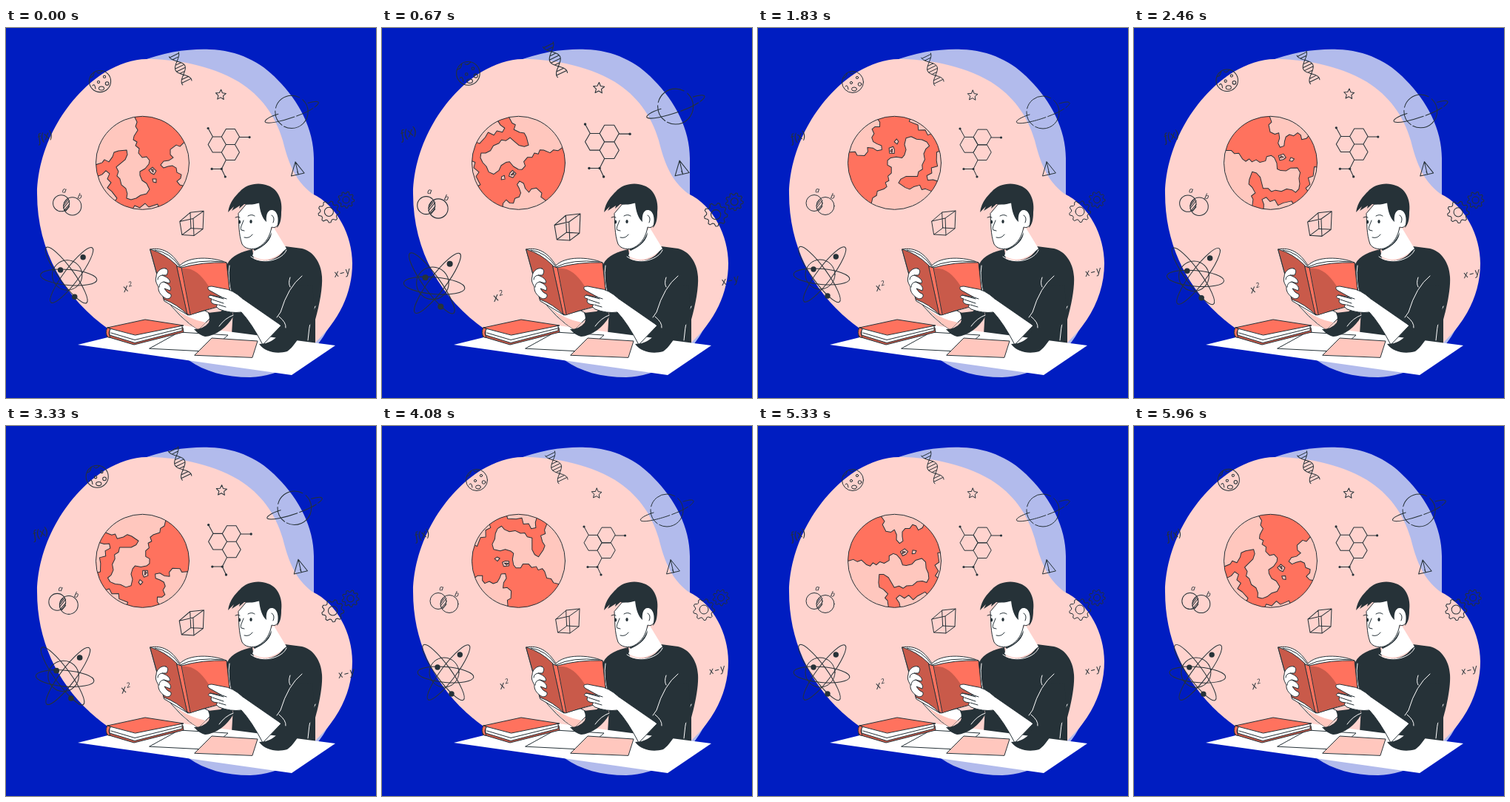
An HTML page that plays this animation: 500 px wide and 500 px high, repeating every 6 s.

```html
<!DOCTYPE html>
<html lang="en">
<head>
<meta charset="utf-8">
<title>Student reading</title>
<style>
  html, body { margin: 0; width: 100%; height: 100%; overflow: hidden; background: #001dc1; }
  svg { display: block; width: 100vw; height: 100vh; }
  text { font-family: "Open Sans", "Noto Sans", sans-serif; font-style: italic; fill: #263238; stroke: none; }
  .line { fill: none; stroke: #263238; stroke-width: 1; stroke-linejoin: round; stroke-linecap: round; }
  .ink { fill: #263238; stroke: none; }
  .skin { fill: #fff; }
  .coral { fill: #ff725e; }
  .deep { fill: #c95a4a; }
  .pale { fill: #ffd3ce; }
  .blush { fill: #ffc7be; }
  .light { stroke: #fff; }
</style>
</head>
<body>
<svg viewBox="0 0 500 500" xmlns="http://www.w3.org/2000/svg">
  <defs><clipPath id="disc"><circle cx="184.5" cy="182.3" r="63"/></clipPath></defs>
  <rect width="500" height="500" fill="#001dc1"/>
  <path fill="#b2bbec" d="M180 46C214 32 248 28 275 29C313 30 345 46 367 70C396 99 416 137 416 176L416 228C450 300 462 375 433 410C411 450 371 470 330 472C296 472 268 464 247 449L170 400Z"/>
  <path class="pale" d="M42 224C43 157 84 90 135 59C152 49 172 42 190 42C225 42 275 49 315 73C345 92 364 118 374 152C383 188 393 208 414 224C448 240 468 281 468 318C468 358 450 396 416 427L300 450L140 408C80 366 42 302 42 224Z"/>

  <g id="doodles" class="line">
    <g id="moon">
      <circle cx="128" cy="73" r="14.5"/><circle cx="126" cy="74" r="1.6"/><circle cx="137.5" cy="76" r="2.3"/>
      <ellipse cx="130" cy="82.5" rx="3.5" ry="2.5"/><circle cx="134" cy="67" r="1.6"/>
      <path d="M115 68q5 -1 5 -7M118 79q3 -4 4 4M124 61q3 3 7 -2"/>
    </g>
    <path id="dna"/>
    <path id="star"/>
    <g id="saturn">
      <circle cx="385" cy="114" r="22" stroke-dasharray="45 3 22 4 40 5"/>
      <path d="M367 117C354 121 347 126 350 128C356 131 383 124 403 115C416 109 424 102 420 100.5C418 99 411 101 407 102" stroke-dasharray="62 3 24 3"/>
    </g>
    <g id="molecule"></g>
    <path d="M390 181L384.5 200L402 196ZM390 181L394 198M394 198L392.5 194"/>
    <path id="gears"/>
    <path d="M235 261L253 257L254 280L238 279ZM249 249L267 247L266 271L250 270ZM235 261L249 249M253 257L267 247M254 280L266 271M238 279L250 270"/>
    <g id="venn">
      <circle cx="76" cy="236.5" r="11"/><circle cx="91" cy="240.5" r="12"/>
      <path d="M79 240l6 -8M79 243l8 -10M80 246l7 -8M82 247l5 -6M80 236l3 -4"/>
      <text x="77" y="222" font-size="10" transform="rotate(8 77 222)">a</text>
      <text x="97.5" y="230" font-size="10" transform="rotate(12 98 230)">b</text>
    </g>
    <g id="atom">
      <circle cx="84" cy="333" r="20"/>
      <ellipse cx="86" cy="336" rx="38" ry="10.5" transform="rotate(5 86 336)"/>
      <ellipse cx="83" cy="333" rx="46" ry="10" transform="rotate(54 83 333)"/>
      <ellipse cx="90" cy="333" rx="46" ry="10" transform="rotate(-53 90 333)"/>
      <g class="ink"><circle cx="105.3" cy="309" r="3.7"/><circle cx="75" cy="326" r="3.7"/><circle cx="94" cy="362" r="3.7"/></g>
    </g>
    <g transform="translate(160.5 356) rotate(-18)"><text font-size="14">x</text><text x="8.5" y="-5" font-size="9">2</text></g>
    <text transform="translate(443 336) rotate(-14)" font-size="13" letter-spacing="1.6">x–y</text>
    <text transform="translate(46 155) rotate(-20)" font-size="15">f(x)</text>
  </g>

  <circle class="blush" cx="184.5" cy="182.3" r="63"/>
  <g clip-path="url(#disc)">
    <g id="land" class="line">
      <path class="coral" d="M174 110L174 121L177 127L175 133L178 138L173 146L172 151L177 154L175 159L180 163L179 169L184 175L190 174L194 179L193 184L188 190L181 194L181 199L184 206L190 210L194 218L190 224L182 226L176 230L169 232L163 230L164 224L162 217L156 212L154 204L150 200L152 194L149 188L155 183L161 178L164 171L163 165L152 166L146 168L144 174L139 181L133 178L130 182L115 187L115 260L250 260L250 216L235 212L231 207L236 203L237 198L231 195L230 189L225 186L219 187L213 189L209 185L213 180L220 179L226 175L222 171L222 164L230 158L235 160L240 155L250 153L250 110Z"/>
      <path class="blush" d="M193 192L198 188L203 193L200 198L196 196ZM198 204L203 204L203 209L199 208ZM168 250L174 240L181 243L188 237L193 242L205 238L209 250ZM118 203L130 198L135 193L140 197L137 204L142 209L137 216L143 221L150 230L145 238L133 235Z"/>
      <path class="coral" d="M196 191L199 191L199 195Z"/>
    </g>
  </g>
  <circle class="line" cx="184.5" cy="182.3" r="63"/>

  <g id="reader" class="line">
    <path class="ink" d="M333 299C319 302 305 307 299 319C296 341 304 361 307 380L305 414L418 428L418 394C424 373 428 350 427 336C426 316 414 301 400 298L377 295C374 311 351 319 335 312Z"/>
    <path class="skin" stroke="none" d="M338 292L333 308Q355 321 379 298L362 270Z"/>
    <path class="light" d="M331 309C348 321 374 313 379 300M418 376Q411 387 408 422"/>
    <path class="skin" d="M314 251C315 264 314 278 319 292C323 299 333 300 340 297C352 291 357 280 359 269C367 272 371 262 369 250L351 235L325 238Z"/>
    <path class="ink" d="M334 299C346 297 354 288 359 276Q358 291 336 301Z"/>
    <path class="ink" d="M300 249C302 235 310 227 316 221C325 210 343 208 354 213C369 218 374 235 372 249C372 260 370 266 366 270C370 256 366 246 359 246C353 246 351 254 352 262C346 257 343 247 342 236C336 239 328 239 322 238L315 244L316 240L305 247L308 241Z"/>
    <path d="M310 256q3 -2 6 0M327 254q5 -3 9 0M321 260C319 266 316 270 318 273L322 274M322 283Q329 285 333 279M359 253q5 3 2 10"/>
    <ellipse class="ink" cx="315.5" cy="262" rx="1.7" ry="2.5"/><ellipse class="ink" cx="331" cy="261.5" rx="1.7" ry="2.5"/>

    <path class="skin" d="M97 428L215 399L445 429L386 469Z" stroke="none"/>
    <path class="skin" d="M194 433L234 411L300 415L275 437Z"/>
    <path class="blush" d="M255 442L278 419L340 423L333 445Z"/>

    <path class="deep" d="M137 405L136 417L173 428L240 411L239 405Z"/>
    <path class="skin" d="M140 407L140 415L174 425.5L238 409L238 402Z"/>
    <path d="M142 412L174 421.5L237 406"/>
    <path class="coral" d="M137 405L188 394L240 402L175 415Z"/>
    <path class="coral" d="M137 405Q133 412 138 418L141 418Q137 412 141 407Z"/>

    <path class="skin" d="M213 362Q235 393 260 408L280 388L239 366Z"/>
    <path class="blush" d="M226 377Q244 398 260 408L270 398Q247 394 226 377Z" stroke="none"/>
    <path class="ink" d="M273 385L290 383L304 373L307 390C299 404 284 416 269 417Q261 415 254 407Q267 407 274 398Q276 391 273 385Z"/>
    <path class="light" d="M307 388Q296 392 288 403M302 321Q299 340 305 360"/>

    <path class="skin" d="M195 299C211 296 224 303 235 321C247 308 279 309 298 317L304 372L246 388L214 369Z"/>
    <path d="M201 300Q222 303 235 323Q257 312 294 316"/>
    <path class="deep" d="M195 299Q215 305 231 321L246 388Q231 373 214 367Z"/>
    <path class="coral" d="M231 322L237 324Q265 316 298 317L304 372Q274 378 248 388L245 386Z"/>
    <path class="deep" d="M238 325Q257 322 274 349L302 373Q272 379 249 387Z" stroke="none"/>
    <path d="M237 324L249 387"/>

    <path class="skin" d="M216 325C209 323 203 330 203 336C201 342 204 346 206 350C205 357 211 363 217 366Q224 366 223 360Q217 358 214 352L222 355Q225 348 213 343L221 345Q224 339 211 334L217 334Q221 327 216 325Z"/>
    <path d="M211 334Q205 335 205 340M213 343Q207 344 207 350"/>

    <path class="skin" d="M320 366L372 402L347 428Q332 399 318 384Q304 386 288 380Q282 376 286 374Q274 373 278 366Q270 364 276 361L292 364L274 354Q270 349 278 349L293 352Q306 353 320 366Z"/>
    <path d="M276 361L294 366M279 367L294 372M287 374L297 377M292 364L298 366"/>
    <path class="ink" d="M362 391Q373 371 384 349L414 347L418 394C398 411 391 430 380 437C366 441 350 438 342 427C359 427 372 416 371 402Z"/>
    <path class="light" d="M400 335Q381 350 371 384L366 391M369 390Q379 398 378 405M384 337Q381 345 384 350"/>
  </g>
</svg>
<script>
const $ = id => document.getElementById(id);
const PERIOD = 6000, SPIN = 3000, LEAD = 45;
const polar = (cx, cy, r, a) => `${(cx + r * Math.cos(a)).toFixed(2)} ${(cy + r * Math.sin(a)).toFixed(2)}`;
const loop = points => `M${points.join('L')}Z`;
const ring = (n, cx, cy, radius, start = 0) =>
  loop(Array.from({ length: n }, (_, i) => polar(cx, cy, radius(i), start + i * 2 * Math.PI / n)));
const circle = (cx, cy, r) => `M${cx - r} ${cy}a${r} ${r} 0 1 0 ${2 * r} 0a${r} ${r} 0 1 0 ${-2 * r} 0`;

$('star').setAttribute('d', ring(10, 290, 91.3, i => i % 2 ? 3.4 : 7.2, -Math.PI / 2 + 0.05));

// Each tooth takes four corners: two outside, two inside.
const gear = (cx, cy, inner, outer, hole) =>
  ring(36, cx, cy, i => i % 4 < 2 ? outer : inner) + circle(cx, cy, hole);
$('gears').setAttribute('d', gear(435, 248, 11.5, 14.5, 6) + gear(458, 232, 8.5, 11, 4.5));

function drawDna() {
  const at = (u, side) => {
    const w = 7 * side * Math.cos(u * Math.PI * 2.1);
    return `${(227 + 18 * u + w * 0.9).toFixed(1)} ${(37 + 38 * u - w * 0.44).toFixed(1)}`;
  };
  const steps = Array.from({ length: 31 }, (_, i) => i / 30);
  const strand = side => 'M' + steps.map(u => at(u, side)).join('L');
  const rungs = steps.filter((_, i) => i % 3 === 1).map(u => `M${at(u, 1)}L${at(u, -1)}`).join('');
  $('dna').setAttribute('d', strand(1) + strand(-1) + rungs);
}
drawDna();

const cells = [[303, 147.5], [285, 157.8], [303, 168.2]].map(([x, y]) => ring(6, x, y, () => 12)).join('');
const atoms = [[273, 136], [328.5, 148], [278, 190.5], [296, 201], [291, 190.5]];
$('molecule').innerHTML =
  `<path d="${cells}M279 147L273 136M315 148L328 148M297 178.5L291 190.5L278 190.5M291 190.5L296 201"/>` +
  atoms.map(([x, y]) => `<circle class="ink" cx="${x}" cy="${y}" r="1.6"/>`).join('');

// Heartbeat: two linear beats, then rest.
const beats = [[0, 1], [0.1, 1.1], [0.3, 1], [0.4, 1], [0.5, 1.1], [0.6, 1], [1, 1]];
function heartbeat(p) {
  const i = beats.findIndex(([at]) => at > p);
  const [[p0, s0], [p1, s1]] = [beats[i - 1], beats[i]];
  return s0 + (s1 - s0) * (p - p0) / (p1 - p0);
}

function render(t) {
  const scale = heartbeat(((t + LEAD) % PERIOD) / PERIOD);
  $('doodles').setAttribute('transform', `translate(256.5 201.8) scale(${scale}) translate(-256.5 -201.8)`);
  $('land').setAttribute('transform', `rotate(${(t % SPIN) / SPIN * 360} 184.5 182.3)`);
}

const start = performance.now();
function tick() {
  render((performance.now() - start) % PERIOD);
  requestAnimationFrame(tick);
}
render(0);
requestAnimationFrame(tick);
</script>
</body>
</html>
```
